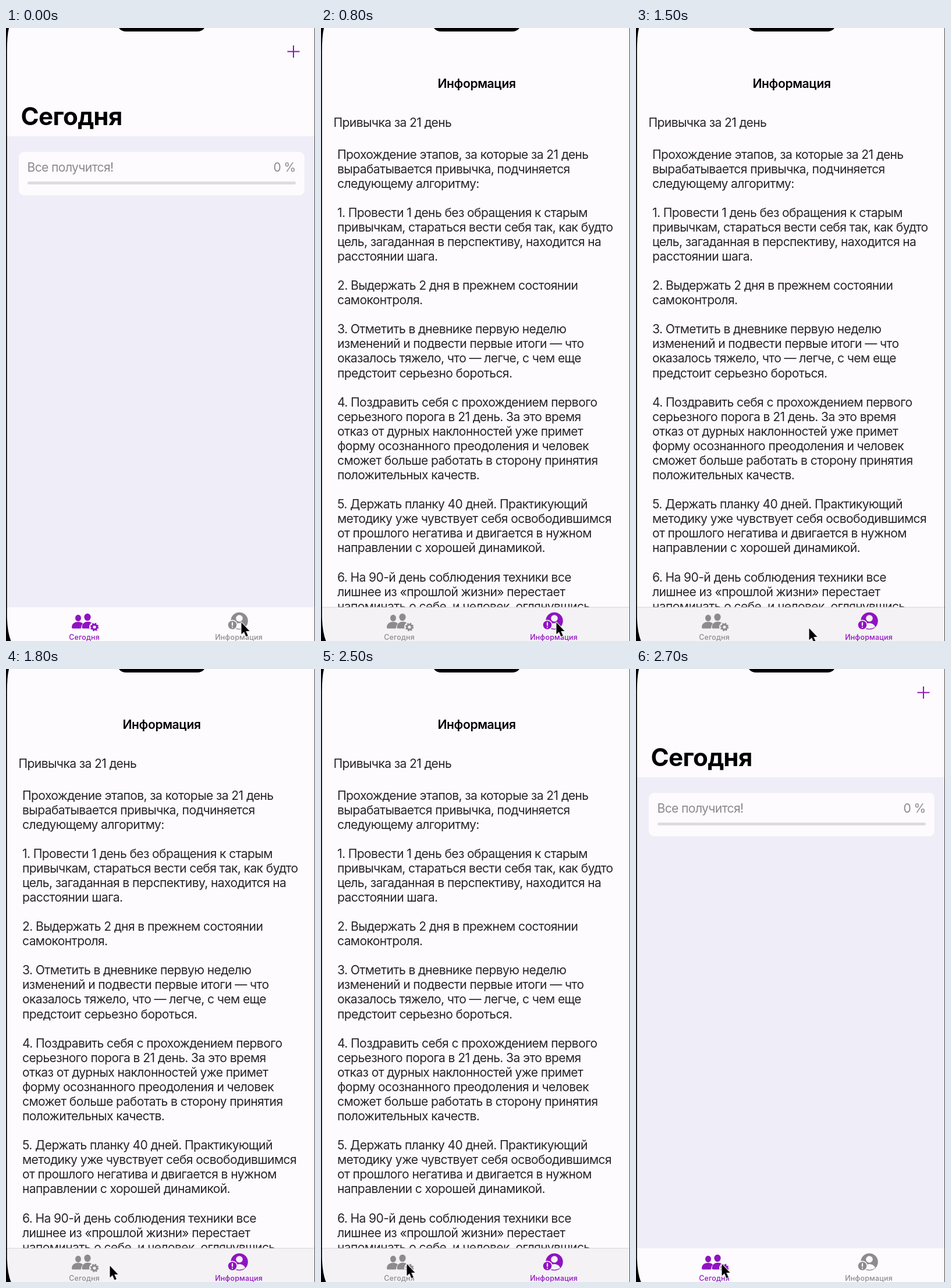
An HTML page that plays this animation: 531x1054 px, repeating every 2800 ms.

```html
<!DOCTYPE html>
<html lang="ru">
<head>
<meta charset="utf-8">
<title>Привычки</title>
<style>
html, body { margin: 0; height: 100%; overflow: hidden; background: #fdfbfe; }
svg { display: block; width: 100vw; height: 100vh; }
text {
  font: 400 21.05px Inter, "Open Sans", sans-serif;
  font-optical-sizing: none;
  letter-spacing: -.6px;
  white-space: pre;
}
.title { font-size: 42.1px; font-weight: 700; letter-spacing: -.6px; }
.nav { font-weight: 600; letter-spacing: -.35px; text-anchor: middle; }
.muted { fill: #8b898e; }
.copy { fill: #262528; }
.end { text-anchor: end; }
.label { font-size: 12.4px; font-weight: 500; letter-spacing: .2px; text-anchor: middle; }
.tab { fill: #8d8b90; color: #8d8b90; }
.on { fill: #9013c0; color: #9013c0; }
#today, #info { animation: 2.8s step-end infinite; }
#today { animation-name: today; }
#info { animation-name: info; }
#cursor { animation: move 2.8s step-end infinite; }
@keyframes today {
  0%, 92.857% { visibility: visible; }
  28.571% { visibility: hidden; }
}
@keyframes info {
  0%, 92.857% { visibility: hidden; }
  28.571% { visibility: visible; }
}
@keyframes move {
  0% { transform: translate(404.5px, 1022px); }
  46.428% { transform: translate(384px, 1026px); }
  50% { transform: translate(342px, 1030px); }
  53.571% { transform: translate(297.5px, 1032px); }
  57.143% { transform: translate(246px, 1031px); }
  60.714% { transform: translate(202px, 1029px); }
  64.286% { transform: translate(178.5px, 1026px); }
  67.857% { transform: translate(160px, 1024px); }
  71.429%, 100% { transform: translate(147.5px, 1023px); }
}
</style>
</head>
<body>
<svg viewBox="0 0 531 1054">
  <defs>
    <mask id="gearGap" maskUnits="userSpaceOnUse" x="105" y="1000" width="60" height="40">
      <path fill="#fff" d="M105 1000h60v40h-60z"/>
      <circle cx="152" cy="1030" r="9"/>
    </mask>
    <mask id="faceGap" maskUnits="userSpaceOnUse" x="375" y="1000" width="50" height="40">
      <path fill="#fff" d="M375 1000h50v40h-50z"/>
      <circle cx="401" cy="1015" r="5.8"/>
      <path d="M391 1030c2-9 18-9 20 0q-10 6-20 0z"/>
      <circle cx="389" cy="1026.500" r="9"/>
    </mask>
    <mask id="markGap" maskUnits="userSpaceOnUse" x="375" y="1010" width="30" height="30">
      <path fill="#fff" d="M375 1010h30v30h-30z"/>
      <path stroke="#000" stroke-width="2.200" stroke-linecap="round" d="M389 1022.500v4.500M389 1030.400v.1"/>
    </mask>
    <g id="people">
      <g mask="url(#gearGap)">
        <ellipse cx="124" cy="1014.500" rx="5" ry="5.700"/>
        <ellipse cx="140" cy="1013" rx="5.600" ry="6.300"/>
        <path d="M113 1030.500c0-11 15-11.500 19-6.500q-3 3.500-3.200 8.500h-13.800q-2 0-2-2z"/>
        <path d="M130.500 1030.500c0-13 20-13 21 0q0 2-2 2h-17q-2 0-2-2z"/>
      </g>
      <g fill="none" stroke="currentColor">
        <circle cx="152" cy="1030" r="4.200" stroke-width="3.200"/>
        <circle cx="152" cy="1030" r="6.200" stroke-width="2" stroke-dasharray="2.600 2.270"/>
      </g>
      <text class="label" x="134.500" y="1051.500">Сегодня</text>
    </g>
    <g id="person">
      <circle cx="401" cy="1019.500" r="14.800" mask="url(#faceGap)"/>
      <circle cx="389" cy="1026.500" r="7.300" mask="url(#markGap)"/>
      <text class="label" x="400" y="1051.500">Информация</text>
    </g>
  </defs>

  <path fill="#fdfbfe" d="M0 0h531v1054H0z"/>

  <g id="today">
    <path fill="#efedf7" d="M0 186h531v810H0z"/>
    <path stroke="#9013c0" stroke-width="2" d="M483.500 40.500h21M494 30v21"/>
    <text class="title" x="25.500" y="167">Сегодня</text>
    <rect x="22" y="213" width="491" height="74.500" rx="9" fill="#fdfbfe"/>
    <text class="muted" x="36.500" y="246.500">Все получится!</text>
    <text class="muted end" x="497.500" y="246.500">0 %</text>
    <rect x="37" y="264" width="461" height="5" rx="2.500" fill="#dedce1"/>
    <use href="#people" class="tab on"/>
    <use href="#person" class="tab"/>
  </g>

  <g id="info">
    <text class="nav" x="267.500" y="102.500">Информация</text>
    <text class="copy" x="21.500" y="169.500">Привычка за 21 день</text>
    <g id="copy" class="copy"></g>
    <path fill="#f4f2f5" d="M0 996h531v58H0z"/>
    <path fill="#d6d4d8" d="M0 995.500h531v1H0z"/>
    <use href="#people" class="tab"/>
    <use href="#person" class="tab on"/>
  </g>

  <path d="M0 0h5Q1.700 14 1.700 40V1010Q2 1038 8.500 1054H0z"/>
  <path d="M530.300 0h.7v1054h-.7z"/>
  <path d="M194 0h147q-4 6-13 6H207q-9 0-13-6z"/>

  <path id="cursor" stroke="#fff" stroke-width="2.200" stroke-linejoin="round" paint-order="stroke"
    d="M0 0V20.500L4.500 16.300 8 24.500 11.300 23 7.800 15H14z"/>
</svg>
<script>
const copy = `Прохождение этапов, за которые за 21 день
вырабатывается привычка, подчиняется
следующему алгоритму:

1. Провести 1 день без обращения к старым
привычкам, стараться вести себя так, как будто
цель, загаданная в перспективу, находится на
расстоянии шага.

2. Выдержать 2 дня в прежнем состоянии
самоконтроля.

3. Отметить в дневнике первую неделю
изменений и подвести первые итоги — что
оказалось тяжело, что — легче, с чем еще
предстоит серьезно бороться.

4. Поздравить себя с прохождением первого
серьезного порога в 21 день. За это время
отказ от дурных наклонностей уже примет
форму осознанного преодоления и человек
сможет больше работать в сторону принятия
положительных качеств.

5. Держать планку 40 дней. Практикующий
методику уже чувствует себя освободившимся
от прошлого негатива и двигается в нужном
направлении с хорошей динамикой.

6. На 90-й день соблюдения техники все
лишнее из «прошлой жизни» перестает
напоминать о себе, и человек, оглянувшись`;
const lineHeight = 25.07;
const box = document.getElementById('copy');
copy.split('\n').forEach((line, i) => {
  const row = document.createElementNS('http://www.w3.org/2000/svg', 'text');
  row.setAttribute('x', 28);
  row.setAttribute('y', 224.5 + i * lineHeight);
  row.textContent = line;
  box.append(row);
});
</script>
</body>
</html>
```
